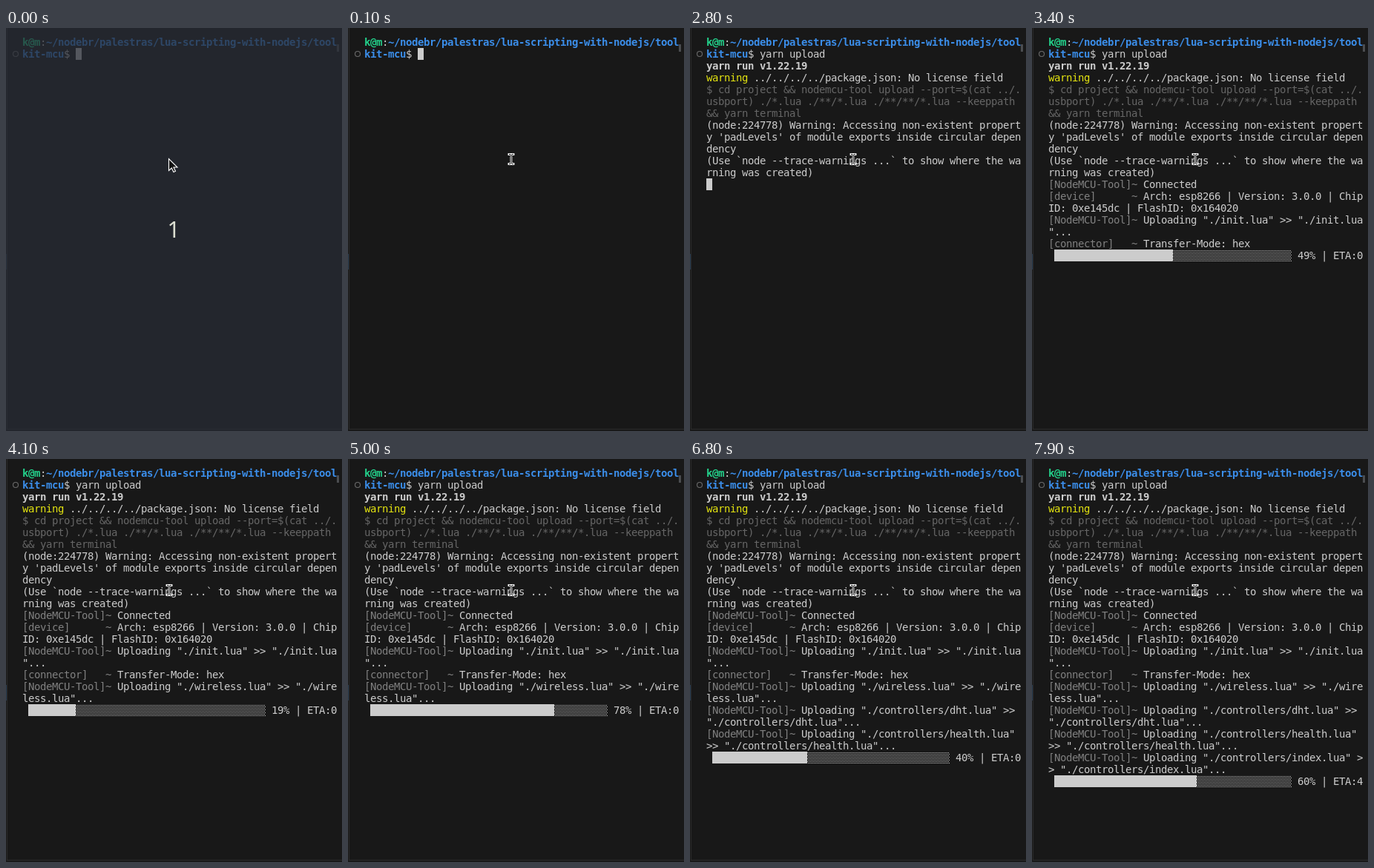
These frames come from a looping animation (453x544 px, 8000 ms). An HTML page with a canvas:

```html
<!DOCTYPE html>
<html lang="en">
<head>
<meta charset="utf-8">
<title>Terminal upload</title>
<style>
  html, body { margin: 0; width: 453px; height: 544px; overflow: hidden; background: #181818; }
  canvas { display: block; }
</style>
</head>
<body>
<canvas id="stage" width="453" height="544"></canvas>
<script>
const LOOP = 8000, COLS = 53, CELL_W = 8, CELL_H = 16, LEFT = 22, TOP = 11, BAR = 40;
const FG = '#cccccc', GREY = '#808080', DIM = '#666666';
const GREEN = '#23d18b', BLUE = '#3b8eea', YELLOW = '#e5e510';
const ctx = document.getElementById('stage').getContext('2d');

// A line is a list of runs: [text, colour, bold]
const tool = text => [['[NodeMCU-Tool]~ ', GREY], [text, FG]];
const upload = file => tool(`Uploading "./${file}" >> "./${file}"...`);
const prompt = typed => [
  ['k@m', GREEN, true], [':', FG],
  ['~/nodebr/palestras/lua-scripting-with-nodejs/toolkit-mcu', BLUE, true],
  ['$ ' + typed, FG]
];

// Output blocks, each with the time it appears
const output = [
  [2700, [['yarn run v1.22.19', FG, true]]],
  [2700, [['warning', YELLOW], [' ../../../../package.json: No license field', FG]]],
  [2700, [['$ cd project && nodemcu-tool upload --port=$(cat ../.usbport) ./*.lua ./**/*.lua ./**/**/*.lua --keeppath && yarn terminal', DIM]]],
  [2800, [["(node:224778) Warning: Accessing non-existent property 'padLevels' of module exports inside circular dependency", FG]]],
  [2800, [['(Use `node --trace-warnings ...` to show where the warning was created)', FG]]],
  [3000, tool('Connected')],
  [3100, [['[device]      ~ ', GREY], ['Arch: esp8266 | Version: 3.0.0 | ChipID: 0xe145dc | FlashID: 0x164020', FG]]],
  [3300, upload('init.lua')],
  [3300, [['[connector]   ~ ', GREY], ['Transfer-Mode: hex', FG]]],
  [3700, upload('wireless.lua')],
  [5300, upload('controllers/dht.lua')],
  [6400, upload('controllers/health.lua')],
  [7300, upload('controllers/index.lua')]
];

// Progress: [time, percent, eta]
const progress = [
  [3300, 0, '00'], [3400, 49, '00'], [3600, 98, '00'],
  [3700, 0, '00'], [3800, 9.7, '00'], [4100, 19.5, '00'], [4300, 29.2, '00'],
  [4400, 39, '00'], [4600, 48.7, '00'], [4700, 58.5, '00'], [4800, 68.2, '00'],
  [5000, 78, '00'], [5100, 97.5, '00'],
  [5300, 0, '00'], [5600, 16.6, '00'], [5800, 33.3, '00'], [5900, 50, '00'],
  [6100, 66.6, '00'], [6200, 83.3, '00'], [6300, 100, '00'],
  [6400, 0, '00'], [6600, 20, '00'], [6800, 40, '00'], [7000, 60, '00'],
  [7100, 80, '00'], [7200, 100, '00'],
  [7300, 0, '44'], [7500, 20, '44'], [7700, 40, '44'], [7900, 60, '44']
];

const command = 'yarn upload';
const keyTimes = [500, 600, 800, 900, 1200, 1600, 1800, 1900, 2000, 2200, 2300];
const ENTER = 2500;

function makeShade() {
  const tile = document.createElement('canvas');
  tile.width = 2;
  tile.height = 4;
  const c = tile.getContext('2d');
  c.fillStyle = FG;
  c.fillRect(0, 0, 1, 1);
  c.fillRect(1, 2, 1, 1);
  return ctx.createPattern(tile, 'repeat');
}
const shade = makeShade();

const colX = col => LEFT + col * CELL_W;
const rowY = row => TOP + row * CELL_H;

function rect(color, x, y, w, h) {
  ctx.fillStyle = color;
  ctx.fillRect(x, y, w, h);
}

// Writes runs on the cell grid, wrapping at the last column; returns the end cell
function write(runs, row, col = 0) {
  ctx.textAlign = 'left';
  ctx.textBaseline = 'alphabetic';
  for (const [text, color, bold] of runs) {
    ctx.font = `${bold ? 'bold ' : ''}14px "DejaVu Sans Mono", monospace`;
    ctx.fillStyle = color;
    for (const ch of text) {
      if (col === COLS) { col = 0; row++; }
      if (ch !== ' ') ctx.fillText(ch, colX(col), rowY(row) + 13);
      col++;
    }
  }
  return { row, col };
}

function drawBar([, percent, eta], row) {
  const filled = Math.round(percent / 100 * BAR);
  const y = rowY(row), split = colX(1 + filled);
  rect(FG, colX(1), y, filled * CELL_W, CELL_H);
  rect(shade, split, y, (BAR - filled) * CELL_W, CELL_H);
  const label = `${Math.floor(percent)}% | ETA:${eta}`;
  write([[label.slice(0, COLS - BAR - 2), FG]], row, BAR + 2);
}

function drawFrame() {
  rect('#181818', 0, 0, 453, 544);
  rect('#2b2b2b', 1, 0, 1, 542);
  rect('#2b2b2b', 1, 541, 452, 1);
  rect('#24394c', 0, 305, 1, 21);
  rect('#4b4d50', 446, 22, 3, 10);
  ctx.strokeStyle = '#6b6b6b';
  ctx.lineWidth = 1.1;
  ctx.beginPath();
  ctx.arc(13, 35, 3.5, 0, Math.PI * 2);
  ctx.stroke();
}

function drawTerminal(t) {
  const typed = command.slice(0, keyTimes.filter(k => k <= t).length);
  let pos = write(prompt(typed), 0);
  if (t >= ENTER) pos = { row: pos.row + 1, col: 0 };
  for (const [start, runs] of output) {
    if (t >= start) pos = { row: write(runs, pos.row).row + 1, col: 0 };
  }
  const step = progress.filter(p => p[0] <= t).pop();
  if (step) drawBar(step, pos.row);
  else rect(FG, colX(pos.col), rowY(pos.row), CELL_W, CELL_H);
}

function drawBeam() {
  const beam = new Path2D('M217 170.5H219L220 171.5L221 170.5H223M220 171.5V182.5M217 183.5H219L220 182.5L221 183.5H223');
  ctx.lineCap = 'square';
  ctx.strokeStyle = '#ffffff';
  ctx.lineWidth = 2.8;
  ctx.stroke(beam);
  ctx.lineCap = 'butt';
  ctx.strokeStyle = '#000000';
  ctx.lineWidth = 1;
  ctx.stroke(beam);
}

function drawCountdown() {
  rect('rgba(40,44,54,.73)', 0, 0, 453, 544);
  ctx.font = '30px "Noto Sans", sans-serif';
  ctx.textAlign = 'center';
  ctx.fillStyle = '#dcdfd2';
  ctx.fillText('1', 226, 283);
  const arrow = new Path2D('M219.5 176.5V192.5L223.3 189L226 194.5L228.5 193.3L226 188H231Z');
  ctx.fillStyle = '#111111';
  ctx.fill(arrow);
  ctx.strokeStyle = '#ffffff';
  ctx.lineWidth = 1.1;
  ctx.stroke(arrow);
}

const origin = performance.now();
function tick() {
  const t = (performance.now() - origin) % LOOP;
  drawFrame();
  drawTerminal(t);
  if (t < 100) drawCountdown();
  else drawBeam();
  requestAnimationFrame(tick);
}
tick();
</script>
</body>
</html>
```
